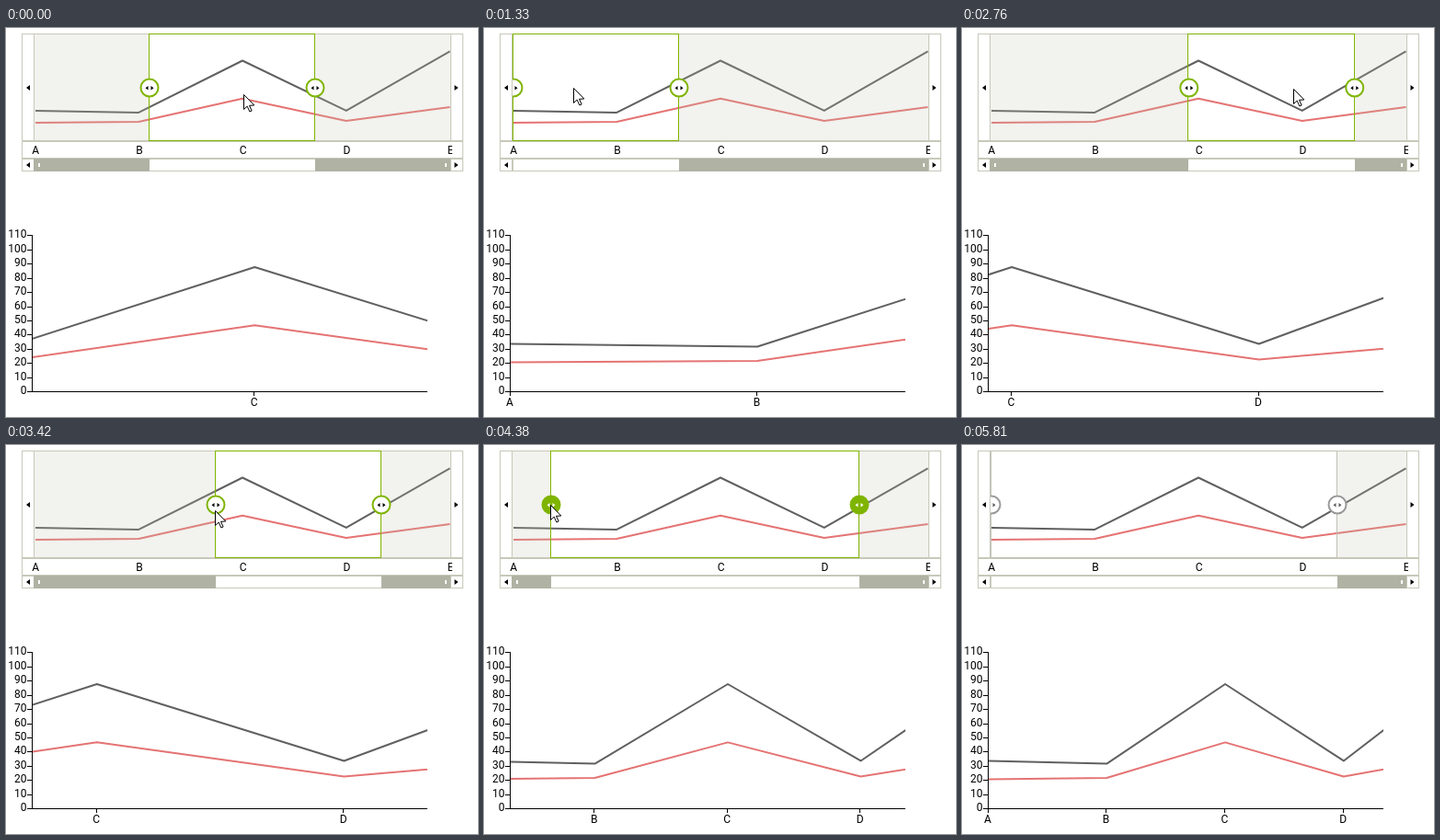
Write an HTML page with a canvas that moves like this. It is 513 px wide and 423 px high and loops after 6840 ms.

```html
<!DOCTYPE html>
<html lang="en">
<head>
<meta charset="utf-8">
<title>Range navigator</title>
<style>
  html, body { margin: 0; width: 100%; height: 100%; overflow: hidden; background: #fff; }
  canvas { display: block; }
</style>
</head>
<body>
<canvas id="stage" width="513" height="423"></canvas>
<script>
const ctx = document.getElementById('stage').getContext('2d');

const LOOP = 6840;
const NAV = { left: 31, right: 483, step: 112.75 };
const SPAN = 180.5;
const GREEN = [127, 180, 0], WHITE = [255, 255, 255];
const FRAME = '#c8c8ba', TRACK = '#b0b2a3';
const CATEGORIES = ['A', 'B', 'C', 'D', 'E'];
const SERIES = [
  { color: '#606060', values: [34, 32, 88, 34, 98] },
  { color: '#e57373', values: [21, 22, 47, 23, 38] }
];

// Each gesture takes the pointer to (x, y) in `count` jumps, one every `every` ms.
const GESTURES = [
  { at: 150, every: 150, count: 1, x: 265, y: 66 },
  { at: 580, every: 120, count: 2, x: 387, y: 66, drag: 'range' },
  { at: 850, every: 120, count: 5, x: 97, y: 65, drag: 'range' },
  { at: 1480, every: 150, count: 4, x: 390, y: 66, drag: 'range' },
  { at: 2240, every: 150, count: 1, x: 416, y: 66 },
  { at: 2490, every: 130, count: 4, x: 341, y: 66, drag: 'range' },
  { at: 3030, every: 130, count: 4, x: 227, y: 71 },
  { at: 3690, every: 138, count: 6, x: 72, y: 65, drag: 'start' },
  { at: 4500, every: 142, count: 5, x: 30, y: 71, drag: 'start' },
  { at: 5500, every: 155, count: 3, x: 36, y: 190, leave: true }
];

const lerp = (a, b, k) => a + (b - a) * k;
const clamp = (v, min, max) => Math.max(min, Math.min(max, v));
const mix = (a, b, k) => `rgb(${a.map((v, i) => Math.round(lerp(v, b[i], k)))})`;

function stateAt(time) {
  const s = { x: 258, y: 72, left: 155, right: 155 + SPAN, pressed: false, fade: 0 };
  for (const g of GESTURES) {
    if (time < g.at) break;
    const k = Math.min(1, (Math.floor((time - g.at) / g.every) + 1) / g.count);
    const x = lerp(s.x, g.x, k);
    if (g.drag === 'range') {
      s.left = clamp(s.left + x - s.x, NAV.left, NAV.right - .5 - SPAN);
      s.right = s.left + SPAN;
    } else if (g.drag === 'start') {
      s.left = Math.max(NAV.left, s.left + x - s.x);
      s.pressed = true;
    }
    if (g.leave) s.fade = k;
    s.x = x;
    s.y = lerp(s.y, g.y, k);
  }
  return s;
}

function rect(x, y, w, h, color) {
  ctx.fillStyle = color;
  ctx.fillRect(x, y, w, h);
}

function frame(x, y, w, h, color) {
  ctx.strokeStyle = color;
  ctx.lineWidth = 1;
  ctx.strokeRect(x + .5, y + .5, w - 1, h - 1);
}

function path(points, close) {
  ctx.beginPath();
  points.forEach(([x, y]) => ctx.lineTo(x, y));
  if (close) ctx.closePath();
}

// dir is -1 for a tip pointing left, 1 for right
function arrow(x, y, dir, w, h, color) {
  path([[x + dir * w / 2, y], [x - dir * w / 2, y - h / 2], [x - dir * w / 2, y + h / 2]], true);
  ctx.fillStyle = color;
  ctx.fill();
}

function label(text, x, y, align = 'center') {
  ctx.font = '12px Roboto, "Open Sans", sans-serif';
  ctx.textAlign = align;
  ctx.fillStyle = '#000';
  ctx.fillText(text, x, y);
}

function clipped(x, y, w, h, draw) {
  ctx.save();
  ctx.beginPath();
  ctx.rect(x, y, w, h);
  ctx.clip();
  draw();
  ctx.restore();
}

function plot(xOf, yOf) {
  ctx.lineWidth = 2;
  ctx.lineJoin = 'round';
  for (const { color, values } of SERIES) {
    path(values.map((v, i) => [xOf(i), yOf(v)]));
    ctx.strokeStyle = color;
    ctx.stroke();
  }
}

function handle(x, pressed, fade) {
  ctx.beginPath();
  ctx.arc(x, 65, 9.5, 0, 2 * Math.PI);
  ctx.fillStyle = pressed ? mix(GREEN, WHITE, fade) : '#fff';
  ctx.fill();
  ctx.strokeStyle = mix(GREEN, [153, 153, 153], fade);
  ctx.lineWidth = 2;
  ctx.stroke();
  const ink = pressed ? mix(WHITE, [90, 90, 90], fade) : '#000';
  for (const dir of [-1, 1]) arrow(x + dir * 3, 65.3, dir, 3, 4.4, ink);
}

function drawNavigator({ left, right, pressed, fade }) {
  const xOf = i => 31.5 + i * NAV.step;
  const from = Math.floor(left), to = Math.floor(right);
  const mask = 'rgba(190,190,170,.2)';

  clipped(32, 7, 451, 115, () => plot(xOf, v => 124.2 - v * 1.008));
  rect(NAV.left, 7, from - NAV.left, 115, mask);
  rect(to, 7, NAV.right - to, 115, mask);

  frame(17, 6, 480, 117, FRAME);
  frame(17, 123, 480, 19, FRAME);
  frame(17, 142, 480, 14, FRAME);
  for (const x of [30, 483]) {
    rect(x, 6, 1, 117, FRAME);
    rect(x, 142, 1, 14, FRAME);
  }
  frame(from, 6, to - from + 1, 117, mix(GREEN, [192, 192, 180], fade));

  clipped(28, 124, 457, 17, () =>
    CATEGORIES.forEach((name, i) => label(name, xOf(i) + .7, 137)));

  // scroll track outside the selection
  if (from > NAV.left) {
    rect(30, 142, from - 29, 14, TRACK);
    rect(35, 147, 2, 4, '#fff');
  } else {
    rect(31, 142, 1, 14, FRAME);
  }
  if (to < NAV.right - 1) {
    rect(to + 1, 142, NAV.right - to - 1, 14, TRACK);
    rect(477, 147, 2, 4, '#fff');
  }
  for (const y of [65, 149]) {
    arrow(24, y, -1, 4, 6, '#000');
    arrow(489.5, y, 1, 4, 6, '#000');
  }
  clipped(31, 40, 452, 50, () => {
    handle(left + 1, pressed, fade);
    handle(right + .5, pressed, fade);
  });
}

function drawChart({ left, right }) {
  const scale = 430 / (right - left);
  const xOf = i => 28 + (NAV.left + i * NAV.step - left) * scale;
  const rise = v => v * 17 / 11;

  clipped(29, 215, 429, 185, () => plot(i => xOf(i) + .5, v => 396 - rise(v)));
  rect(28, 225, 1, 171, '#000');
  rect(28, 395, 430, 1, '#000');
  for (let v = 0; v <= 110; v += 10) {
    const y = Math.round(395.3 - rise(v));
    rect(23, y, 5, 1, '#000');
    label(v, 22.5, y + 3, 'right');
  }
  CATEGORIES.forEach((name, i) => {
    const x = xOf(i);
    if (x < 27.5 || x > 458.5) return;
    rect(Math.floor(x), 396, 1, 4, '#000');
    label(name, x - .2, 411);
  });
}

function drawPointer({ x, y }) {
  const outline = [[0, 0], [0, 16], [3.7, 12.6], [6.4, 18.5], [8.6, 17.5], [6, 11.8], [11.3, 11.5]];
  path(outline.map(([dx, dy]) => [Math.round(x) + .5 + dx, Math.round(y) + .5 + dy]), true);
  ctx.fillStyle = '#fff';
  ctx.fill();
  ctx.strokeStyle = '#000';
  ctx.lineWidth = 1;
  ctx.stroke();
}

function draw(now) {
  const state = stateAt(now % LOOP);
  rect(0, 0, 513, 423, '#fff');
  drawNavigator(state);
  drawChart(state);
  if (state.fade < 1) drawPointer(state);
}

const start = performance.now();
function tick() {
  draw(performance.now() - start);
  requestAnimationFrame(tick);
}
tick();
</script>
</body>
</html>
```
